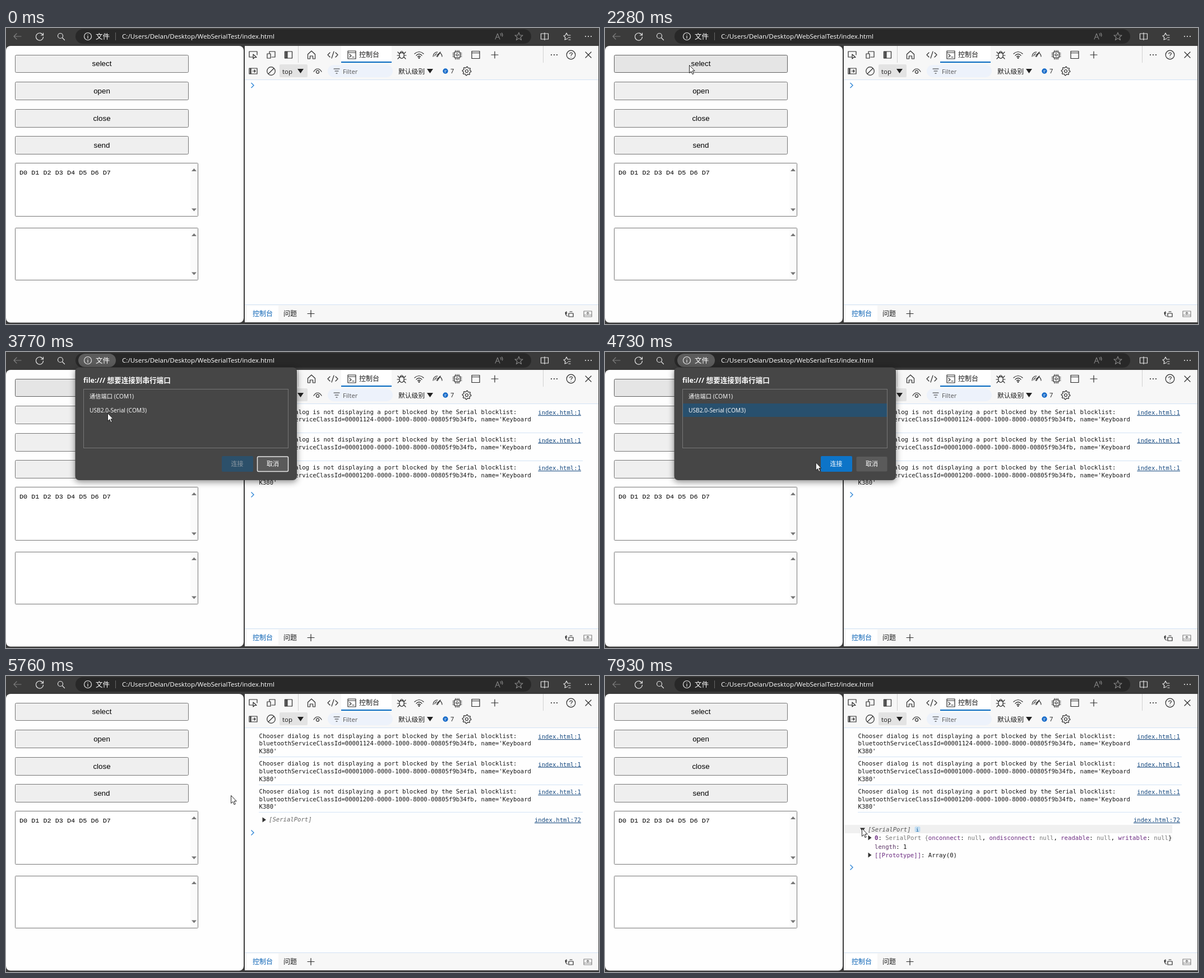
An HTML page that plays this animation: 1058 by 529 pixels, repeating every 8 s.

```html
<!DOCTYPE html>
<html lang="zh">
<head>
<meta charset="utf-8">
<title>WebSerialTest</title>
<style>
html, body { margin: 0; height: 100%; overflow: hidden; background: #3b3b3b; }
svg { display: block; width: 100vw; height: 100vh; }
text { font: 12px "Open Sans", "Noto Sans CJK SC", "Noto Sans CJK", sans-serif; fill: #1b1b1b; }
.icon { fill: none; stroke: #2b2b2b; stroke-width: 1.2; stroke-linejoin: round; stroke-linecap: round; }
.top { stroke: #e4e4e4; }
.dim { stroke: #808080; }
.mono { font: 10.61px "DejaVu Sans Mono", monospace; fill: #151515; }
.link { fill: #174a80; text-decoration: underline; text-anchor: end; }
.gray { fill: #777; }
.purple { fill: #6b2a80; }
.label { font: 13.33px "Liberation Sans", Arial, sans-serif; text-anchor: middle; fill: #000; }
.area { font: 11.8px "Liberation Mono", monospace; fill: #000; }
.blue { fill: #0b63b5; }
.prompt { fill: none; stroke: #2f86d6; stroke-width: 1.4; }
#dialog text { fill: #fff; font-size: 10.25px; }
#dialog .mid { font-size: 11px; text-anchor: middle; }
#dialog .title { font-size: 12.6px; font-weight: bold; }
.shadow { filter: drop-shadow(0 3px 6px #0007); }
</style>
</head>
<body>
<svg viewBox="0 0 1058 529">
  <rect width="1058" height="529" fill="#3b3b3b"/>
  <rect x="124" y="2" width="813" height="26" rx="13" fill="#282828"/>
  <rect id="chip" x="129" y="3" width="67" height="24" rx="12" fill="#5c5c5c"/>
  <text x="160" y="19.5" style="font-size:12.5px;fill:#fff">文件</text>
  <path id="chipLine" d="M195.5 8V22" stroke="#666"/>
  <text x="207" y="19" style="font-size:11.6px;fill:#fff">C:/Users/Delan/Desktop/WebSerialTest/index.html</text>

  <rect y="32" width="424" height="494.500" rx="8" fill="#fefefe"/>
  <g id="page"></g>

  <rect x="426" y="32" width="631" height="494" fill="#fefefe"/>
  <path d="M426 32h631v60H426zM426 495h631v31H426z" fill="#f7f7f7"/>
  <path d="M426 92.500h631M426 494.500h631" stroke="#d3e3f5"/>
  <path d="M598 32h90v29h-90zM430 496h56v29h-56z" fill="#fff"/>
  <path d="M598 60h90v2h-90z" fill="#0067c0"/>
  <path d="M521.500 32v30M958.500 32v30" stroke="#d0d0d0"/>
  <rect x="488" y="65" width="50" height="23" rx="2" fill="#e3e3e3"/>
  <rect x="574" y="66" width="116" height="22" rx="11" fill="#edf2fb"/>
  <path d="M520 73h11l-5.500 8zM751 73h11l-5.500 8z" fill="#222"/>
  <circle cx="784" cy="77" r="4.700" fill="#1268c8"/>
  <path d="M782 76h4M782 78.500h3" stroke="#fff" stroke-width=".9"/>
  <text x="630" y="52">控制台</text>
  <text x="493" y="81.500" style="font-size:11.5px">top</text>
  <text x="601" y="81.500" style="font-size:11.2px;fill:#555">Filter</text>
  <text x="700" y="81.500" style="font-size:11.8px">默认级别</text>
  <text x="793" y="81" style="font-size:11px">7</text>
  <text x="440" y="515" class="blue">控制台</text>
  <text x="495" y="515">问题</text>
  <g id="icons"></g>

  <g id="messages"></g>
  <g id="port">
    <path d="M451 243.500h578" stroke="#d3e3f5"/>
    <text class="mono link" x="1026" y="261">index.html:72</text>
    <g id="closed">
      <path d="M457.500 252.500v9l6.500-4.500z" fill="#333"/>
      <text class="mono" x="469" y="260" style="font-style:italic;fill:#666">[SerialPort]</text>
    </g>
    <g id="opened">
      <rect x="426" y="266" width="586" height="15" fill="#f0f0f0"/>
      <path d="M455 271.500h9l-4.500 6.500zM469.500 284.500v9l6-4.500zM469.500 315.500v9l6-4.500z" fill="#333"/>
      <text class="mono" x="469" y="278" style="font-style:italic;fill:#555">[SerialPort]</text>
      <rect x="552.500" y="269" width="10" height="10" rx="2" fill="#c6dff2"/>
      <text class="mono" x="554.500" y="277.500" style="font-size:9.500px;fill:#17609c">i</text>
      <text class="mono" x="481" y="293" id="fields"></text>
      <text class="mono" x="481" y="309"><tspan fill="#5c3566">length</tspan>: 1</text>
      <text class="mono" x="481" y="324"><tspan class="purple">[[Prototype]]</tspan>: Array(0)</text>
    </g>
  </g>
  <path id="prompt" class="prompt" d="M437.500-4.500l4.500 4.500-4.500 4.500"/>

  <g id="dialog">
    <rect class="shadow" x="123.500" y="27.500" width="395.500" height="201.500" rx="7" fill="#464646"/>
    <text class="title" x="138" y="54.500">file:/// 想要连接到串行端口</text>
    <rect id="row" x="139" y="92" width="365" height="24" fill="#28506e"/>
    <rect x="138.500" y="66.500" width="365" height="105" fill="none" stroke="#777"/>
    <text x="149" y="83">通信端口 (COM1)</text>
    <text x="149" y="107.500">USB2.0-Serial (COM3)</text>
    <rect id="connect" x="385" y="186" width="56" height="28" rx="2"/>
    <text id="connectText" class="mid" x="412.500" y="204">连接</text>
    <rect id="cancel" x="448.500" y="187" width="55" height="26.500" rx="2" fill="#5a5a5a" stroke-width="1.500"/>
    <text class="mid" x="476" y="204">取消</text>
  </g>

  <path id="cursor" d="M.5.5V14.500L3.800 11.500 6 16.700 8.200 15.800 6 10.700H10.200Z" fill="#fff" stroke="#222"/>
</svg>
<script>
const $ = id => document.getElementById(id);
const show = (id, on) => $(id).style.display = on ? '' : 'none';
const clamp = v => Math.min(1, Math.max(0, v));

// Page: four buttons and two text areas
const buttons = [['select', 48.5, 31], ['open', 96.5, 32], ['close', 145.5, 32], ['send', 193.5, 32]];
const arrow = (y, s) => `<path d="M331 ${y + 2.5 * s}h9l-4.500 ${-5 * s}z" fill="#777"/>`;
const area = (y, h) => `<rect x="16.500" y="${y}" width="326" height="${h}" rx="1" fill="#fff" stroke="#767676"/>
  <path d="M329 ${y + 1}h13v${h - 2}h-13z" fill="#fbfbfb"/>${arrow(y + 12, 1)}${arrow(y + h - 11.5, -1)}`;
$('page').innerHTML = buttons.map(([name, y, h], i) =>
  `<rect id="b${i}" x="16.500" y="${y}" width="309" height="${h}" rx="2" stroke="#767676"/>
   <text class="label" x="171" y="${y + h / 2 + 4.3}">${name}</text>`).join('') +
  area(241.5, 95) + area(357.5, 93) +
  '<text class="area" x="24" y="262">D0 D1 D2 D3 D4 D5 D6 D7</text>';

// Icons, drawn around their own centre
const ring = (r, x = 0, y = 0) => `M${x - r} ${y}a${r} ${r} 0 1 1 ${2 * r} 0a${r} ${r} 0 1 1 ${-2 * r} 0`;
const box = (x, y, w, h) => `M${x} ${y}h${w}v${h}h${-w}z`;
const dots = [-5, 0, 5].map(x => ring(.5, x)).join('');
const plus = 'M-6 0H6M0-6V6';
const star = 'M0-7L2-2H7L3 1.500 4.500 6.500 0 3.500-4.500 6.500-3 1.500-7-2H-2Z';
const gear = 'M' + Array.from({length: 32}, (_, k) => {
  const r = k % 4 < 2 ? 7.8 : 6, a = k * Math.PI / 16;
  return `${(r * Math.cos(a)).toFixed(1)} ${(r * Math.sin(a)).toFixed(1)}`;
}).join('L') + 'Z';
const icons = [
  [20, 15, 'M7 0H-6M-1-5L-6 0-1 5', 'dim'],
  [60, 15, 'M6-2A6.500 6.500 0 1 0 6.500 1M6.500-6V-2H2.500', 'top'],
  [98, 15, ring(4.5, -1, -1) + 'M2.500 2.500L6.500 6.500', 'top'],
  [146, 15, ring(6.5) + 'M0-1V3.500M0-3.500V-3.300', 'top'],
  [879, 15, 'M-6 5L-2-5 2 5M-4.500 1.500H.5M3-5Q5-3 4-1M5.500-6Q8-3 6.500 0', 'dim'],
  [915, 15, star, 'dim'],
  [961, 15, box(-6.5, -5, 13, 10) + 'M0-6.500V6.500', 'top'],
  [1001, 15, 'M2-2H6M2 2H6M3 6H6M1 4L-4 6-3 2-6-1-3-2-1-6 1-2', 'top'],
  [1039, 15, dots, 'top'],
  [441, 48, 'M-1 4H-7V-6H7V0M0-1V7L2.500 4.500H6Z'],
  [473, 48, 'M-3-2V-6H7V4H3' + box(-7, -2, 6, 8) + 'M1 4H3'],
  [504, 48, box(-6.5, -6, 13, 12) + 'M-5-6V6M-3.500-6V6M-2-6V6'],
  [545, 48, 'M-6.500 7V-1L0-7 6.500-1V7H2.500V2H-2.500V7Z'],
  [583, 48, 'M-5-4L-9 0-5 4M5-4L9 0 5 4M2-6L-2 6'],
  [617, 48, box(-7, -7, 14, 14) + 'M-7-4H7M-4-1L-1 1.500-4 4M1 4H4'],
  [706, 48, 'M-4-2Q0-6 4-2V3Q0 10-4 3ZM-3-4Q0-9 3-4M-4 1H-8M4 1H8M-4-2L-7-5M4-2L7-5M-4 4L-7 7M4 4L7 7'],
  [737, 48, 'M-8-2Q0-9 8-2M-5 1Q0-4 5 1M-2.500 3.500Q0 1 2.500 3.500' + ring(.8, 0, 5.5)],
  [770, 48, 'M-8 3Q-7-5 0-5M4-4Q8-1 8 3M-5 2Q-4-2-1-2M5-5L0 3Q-2 4-1 1Z'],
  [805, 48, box(-5, -5, 10, 10) + ring(2) + 'M-3-5V-8M0-5V-8M3-5V-8M-3 5V8M0 5V8M3 5V8M-5-3H-8M-5 0H-8M-5 3H-8M5-3H8M5 0H8M5 3H8'],
  [838, 48, box(-7, -6.5, 14, 13) + 'M-7-3.500H7'],
  [872, 48, plus],
  [978, 48, dots],
  [1008, 48, ring(7.8) + 'M-2-2Q-2-4 0-4Q2.500-4 2.300-2Q2-.500 0 1M0 4V4.200'],
  [1039, 48, 'M-5-5L5 5M5-5L-5 5'],
  [441, 77, box(-7, -5, 14, 10) + 'M-5-5V5M-4-5V5M-1 0H4M2-2L4 0 2 2'],
  [473, 77, ring(7.3) + 'M-5 5L5-5'],
  [556, 77, 'M-7 1Q-4-4 0-4T7 1' + ring(2.6, 0, 1.5)],
  [590, 77, 'M-5-4H5M-3 0H3M-1 4H1'],
  [822, 77, gear + ring(2.5)],
  [544, 510.5, plus],
  [1005, 511, box(-1, -1, 8, 6) + 'M1-4H5M-4-2H-7L-5-4M-7-2L-5 0M-7-2Q-6 4-3 4'],
  [1038, 511, box(-7, -5, 14, 10) + 'M-7 2H7M0 1V-3M-2-1L0-3 2-1', 'dim']
];
$('icons').innerHTML = icons.map(([x, y, d, cls = '']) =>
  `<path class="icon ${cls}" transform="translate(${x} ${y})" d="${d}"/>`).join('');

// Console output
$('messages').innerHTML = ['1124', '1000', '1200'].map((id, i) => {
  const y = 110.5 + i * 49.6;
  const lines = ['Chooser dialog is not displaying a port blocked by the Serial blocklist:',
    `bluetoothServiceClassId=0000${id}-0000-1000-8000-00805f9b34fb, name='Keyboard`, "K380'"];
  return lines.map((s, n) => `<text class="mono" x="451.500" y="${y + 13.8 * n}">${s}</text>`).join('') +
    `<text class="mono link" x="1026" y="${y + 1.5}">index.html:1</text>` +
    (i ? `<path d="M451 ${Math.round(y - 15) - .5}h578" stroke="#d3e3f5"/>` : '');
}).join('');
$('fields').innerHTML = '<tspan class="purple" font-weight="bold">0</tspan>: <tspan class="gray">SerialPort {</tspan>' +
  ['onconnect', 'ondisconnect', 'readable', 'writable']
    .map(k => `<tspan class="purple">${k}</tspan>: <tspan class="gray">null</tspan>`).join(', ') + '}';

// Pointer: time, x, y, joined by monotone cubic curves
const path = [
  [120, 965, 535], [680, 781, 316], [880, 781, 316], [1300, 391, 264], [1720, 165, 108],
  [2280, 150, 66], [3160, 150, 66], [3770, 181, 109], [4170, 181, 109], [4870, 398, 207],
  [5690, 398, 207], [5760, 401, 213], [6510, 459, 261], [7380, 459, 261], [7520, 459, 263],
  [7590, 459, 263], [7930, 458, 272], [8000, 458, 272]
];
const slope = (i, c) => path[i] && path[i + 1] ? (path[i + 1][c] - path[i][c]) / (path[i + 1][0] - path[i][0]) : 0;
function tangent(i, c) {
  const a = slope(i - 1, c), b = slope(i, c);
  return a * b > 0 ? 2 * a * b / (a + b) : 0;
}
function pointer(t, c) {
  const i = Math.max(0, path.findIndex(k => k[0] > t) - 1);
  const [p, q] = [path[i], path[i + 1]], d = q[0] - p[0], u = clamp((t - p[0]) / d), v = 1 - u;
  return v * v * (1 + 2 * u) * p[c] + u * u * (1 + 2 * v) * q[c] +
    d * u * v * (v * tangent(i, c) - u * tangent(i + 1, c));
}

function draw(t) {
  const x = pointer(t, 1), y = pointer(t, 2);
  show('cursor', t >= 190);
  $('cursor').setAttribute('transform', `translate(${x} ${y})`);

  const modal = t >= 2480 && t < 5490;
  buttons.forEach(([, top, h], i) => {
    const over = modal ? i === 0 : x > 16 && x < 326 && y > top && y < top + h;
    $('b' + i).setAttribute('fill', over ? '#e5e5e5' : '#efefef');
    $('b' + i).setAttribute('stroke', over ? '#5f5f5f' : '#767676');
  });
  show('chip', modal);
  show('chipLine', !modal);

  const fade = t < 4000 ? 1 - (1 - clamp((t - 2550) / 280)) ** 2 : 1 - clamp((t - 5210) / 210);
  show('dialog', fade > 0);
  $('dialog').setAttribute('opacity', fade);
  $('dialog').setAttribute('transform',
    `translate(321.5 136) scale(${.952 + .048 * fade}) translate(-321.5 -136)`);
  const picked = t >= 3840;
  show('row', picked);
  $('connect').setAttribute('fill', picked ? '#0d74c8' : '#2c506a');
  $('connectText').style.fill = picked ? '#fff' : '#8e9aa3';
  $('cancel').setAttribute('stroke', picked ? 'none' : '#e6e6e6');

  const listed = t >= 2550, granted = t >= 5210, open = t >= 6650;
  show('messages', listed);
  show('port', granted);
  show('closed', !open);
  show('opened', open);
  $('prompt').setAttribute('transform', `translate(0 ${open ? 342 : granted ? 280 : listed ? 255 : 102.5})`);
}

const start = performance.now();
function tick() {
  draw((performance.now() - start) % 8000);
  requestAnimationFrame(tick);
}
tick();
</script>
</body>
</html>
```
